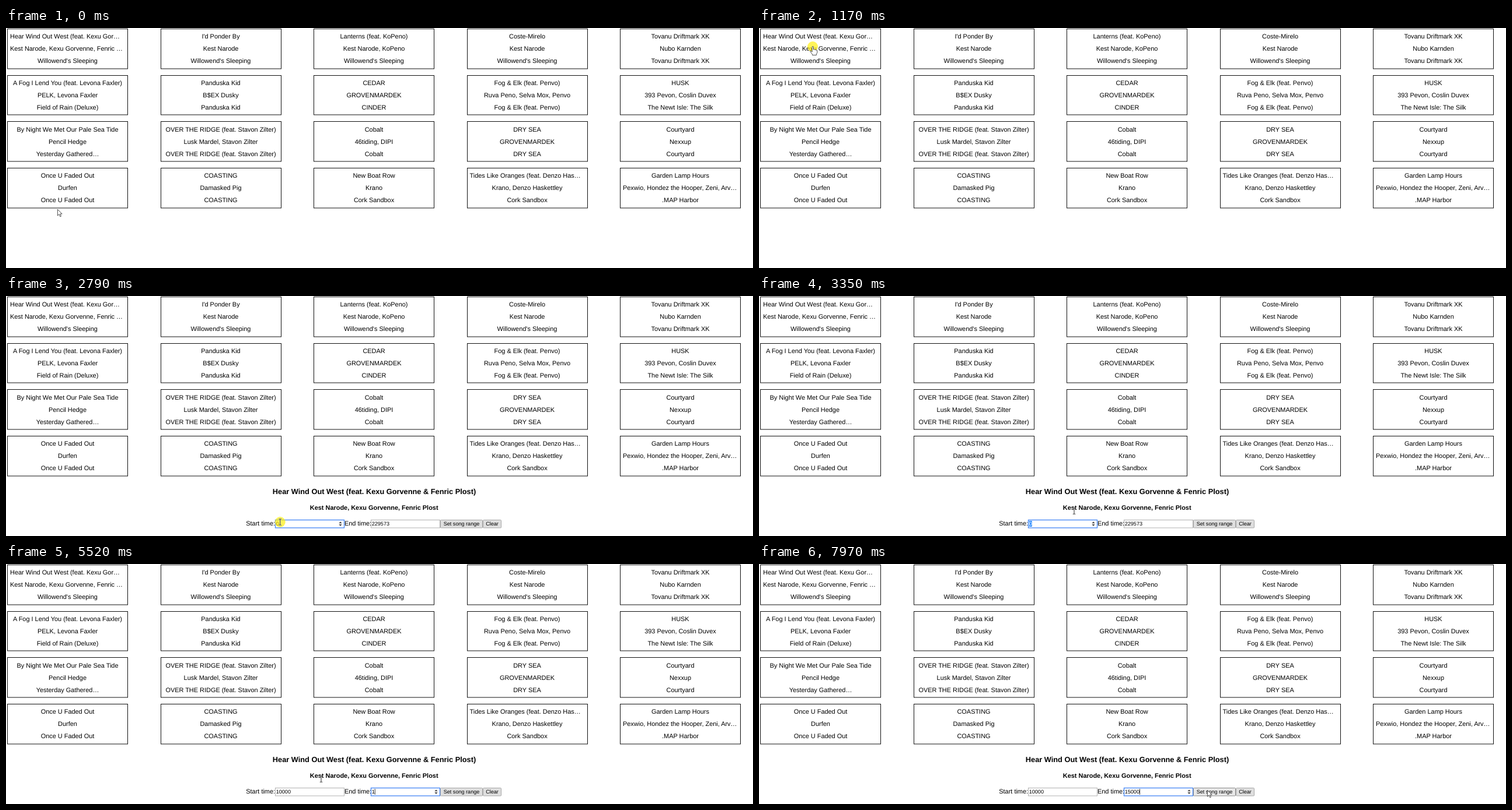
An HTML page that plays this animation: 1280 by 412 pixels, repeating every 8000 ms.

```html
<!DOCTYPE html>
<html lang="en">
<head>
<meta charset="utf-8">
<title>Song range picker</title>
<style>
  html, body { margin: 0; width: 100%; height: 100%; overflow: hidden; background: #fff; }
  svg { display: block; }
  text {
    font: 10.93px "Liberation Sans", Arial, sans-serif;
    text-rendering: geometricPrecision;
    white-space: pre;
  }
  .middle { text-anchor: middle; }
  .title { font-size: 12.79px; font-weight: bold; }
  .artists { font-weight: bold; }
  .control { font-size: 9.1px; }
  .card { fill: none; stroke: #111; }
</style>
</head>
<body>
<svg id="stage" width="1280" height="412" viewBox="0 0 1280 412"></svg>
<script>
const LOOP = 8000;
const stage = document.getElementById('stage');

// Each row holds five cards: title | artists | album. A trailing "~" marks a clipped line.
const rows = [
  ["Hear Wind Out West (feat. Kexu Gor~|Kest Narode, Kexu Gorvenne, Fenric ~|Willowend's Sleeping",
   "I'd Ponder By|Kest Narode|Willowend's Sleeping",
   "Lanterns (feat. KoPeno)|Kest Narode, KoPeno|Willowend's Sleeping",
   "Coste-Mirelo|Kest Narode|Willowend's Sleeping",
   "Tovanu Driftmark XK|Nubo Karnden|Tovanu Driftmark XK"],
  ["A Fog I Lend You (feat. Levona Faxler)|PELK, Levona Faxler|Field of Rain (Deluxe)",
   "Panduska Kid|B$EX Dusky|Panduska Kid",
   "CEDAR|GROVENMARDEK|CINDER",
   "Fog & Elk (feat. Penvo)|Ruva Peno, Selva Mox, Penvo|Fog & Elk (feat. Penvo)",
   "HUSK|393 Pevon, Coslin Duvex|The Newt Isle: The Silk"],
  ["By Night We Met Our Pale Sea Tide|Pencil Hedge|Yesterday Gathered…",
   "OVER THE RIDGE (feat. Stavon Zilter)|Lusk Mardel, Stavon Zilter|OVER THE RIDGE (feat. Stavon Zilter)",
   "Cobalt|46tiding, DIPI|Cobalt",
   "DRY SEA|GROVENMARDEK|DRY SEA",
   "Courtyard|Nexxup|Courtyard"],
  ["Once U Faded Out|Durfen|Once U Faded Out",
   "COASTING|Damasked Pig|COASTING",
   "New Boat Row|Krano|Cork Sandbox",
   "Tides Like Oranges (feat. Denzo Has~|Krano, Denzo Haskettley|Cork Sandbox",
   "Garden Lamp Hours|Pexwio, Hondez the Hooper, Zeni, Arv~|.MAP Harbor"]
];
const COL = 262.5, ROW = 79.67;

function add(parent, tag, attrs = {}, text) {
  const node = document.createElementNS('http://www.w3.org/2000/svg', tag);
  for (const name in attrs) node.setAttribute(name, attrs[name]);
  if (text !== undefined) node.textContent = text;
  parent.append(node);
  return node;
}
const show = (node, on) => node.setAttribute('visibility', on ? 'visible' : 'hidden');

rows.forEach((cards, r) => cards.forEach((card, c) => {
  const left = Math.round(2 + COL * c), top = Math.round(1 + ROW * r);
  const bottom = Math.round(69.6 + ROW * r);
  add(stage, 'rect', { class: 'card', x: left + .5, y: top + .5, width: 206, height: bottom - top - .5 });
  card.split('|').forEach((line, i) => {
    const y = 18.4 + ROW * r + 20.9 * i;
    if (line.endsWith('~')) add(stage, 'text', { x: 7 + COL * c, y }, line.slice(0, -1) + '…');
    else add(stage, 'text', { class: 'middle', x: 105.5 + COL * c, y }, line);
  });
}));

const panel = add(stage, 'g');
add(panel, 'text', { class: 'middle title', x: 631, y: 339.5 },
  'Hear Wind Out West (feat. Kexu Gorvenne & Fenric Plost)');
add(panel, 'text', { class: 'middle artists', x: 630.7, y: 367 },
  'Kest Narode, Kexu Gorvenne, Fenric Plost');
add(panel, 'text', { x: 411.3, y: 394.4 }, 'Start time:');
add(panel, 'text', { x: 580, y: 394.4 }, 'End time:');

function makeField(x) {
  const box = add(panel, 'rect', { x: x + .5, y: 384.5, width: 118, height: 13.5, fill: '#fff' });
  const mark = add(panel, 'rect', { x: x + 1.8, y: 386, height: 10, fill: '#3390ff' });
  const text = add(panel, 'text', { class: 'control', x: x + 1.7, y: 394.4 });
  const caret = add(panel, 'rect', { y: 386, width: .8, height: 10 });
  const spinner = add(panel, 'path', {
    d: `M${x + 109.4} 390.2l2.6-3 2.6 3zm0 1.8l2.6 3 2.6-3z`, fill: '#444'
  });
  return ({ value, focused, selected, caretOn, spin }) => {
    const width = value.length * 5.06;
    box.setAttribute('stroke', focused ? '#4285f4' : '#a9a9a9');
    box.setAttribute('stroke-width', focused ? 1.3 : .9);
    text.textContent = value;
    text.setAttribute('fill', selected ? '#fff' : '#000');
    mark.setAttribute('width', width);
    caret.setAttribute('x', x + 1.7 + width);
    show(mark, selected);
    show(caret, caretOn);
    show(spinner, spin);
  };
}

function makeButton(x, width, label) {
  const box = add(panel, 'rect', { x: x + .5, y: 384.5, width: width - 1, height: 13.5, rx: 1 });
  add(panel, 'text', { class: 'middle control', x: x + width / 2, y: 394.4 }, label);
  return hover => {
    box.setAttribute('fill', hover ? '#e8e8e8' : '#dfdfdf');
    box.setAttribute('stroke', hover ? '#8c8c8c' : '#a8a8a8');
  };
}

const drawStart = makeField(461), drawEnd = makeField(625);
const drawSetButton = makeButton(744, 73, 'Set song range');
makeButton(817, 32, 'Clear')(false);

const pointer = add(stage, 'g');
const press = add(pointer, 'circle', { r: 9, fill: '#ffee00', opacity: .65 });
const ink = { fill: '#fff', stroke: '#222', 'stroke-width': .8, 'stroke-linejoin': 'round' };
const arrow = add(pointer, 'path', { ...ink, d: 'M.4.4V11.2L2.9 8.8 4.8 12.9 6.5 12.1 4.7 8.2H8.1Z' });
const hand = add(pointer, 'path', { ...ink,
  d: 'M-1 9V1Q-1-.4.2-.4T1.4 1V5Q2.6 4 3.7 5.3 5 4.5 5.9 5.9 7.6 5.5 7.7 7.2V10.5L6.3 13V14.6H-.6V13.2L-4.2 8.4Q-4.4 6.8-3 7.1Z' });
const beam = add(pointer, 'g');
const beamPath = 'M-2.2-5.3H-.6L0-4.8.6-5.3H2.2M0-4.8V4.8M-2.2 5.3H-.6L0 4.8.6 5.3H2.2';
add(beam, 'path', { d: beamPath, fill: 'none', stroke: '#fff', 'stroke-width': 2.2, opacity: .6 });
add(beam, 'path', { d: beamPath, fill: 'none', stroke: '#111', 'stroke-width': .9 });

// time, x, y
const path = [
  [0, 88, 311], [50, 88, 308], [250, 100, 250], [450, 107, 150], [650, 99, 60],
  [790, 92, 33], [920, 92, 32], [1630, 92, 32], [1850, 150, 125], [2090, 230, 281.5],
  [2250, 350, 345], [2410, 458, 376], [2460, 464, 385], [2560, 470, 388], [2790, 470, 388],
  [2950, 428, 388], [3020, 428, 388], [3350, 540, 369], [7310, 540, 369],
  [7360, 553, 363], [7460, 600, 358], [7700, 715, 372], [7970, 768, 388], [8000, 768, 388]
];

function pointerAt(t) {
  const i = path.findIndex(point => point[0] > t);
  const [t0, x0, y0] = path[i - 1], [t1, x1, y1] = path[i];
  const k = (t - t0) / (t1 - t0);
  return [x0 + (x1 - x0) * k, y0 + (y1 - y0) * k];
}

function cursorOver(x, y) {
  if (y < 310) return (x - 2) % COL < 207 && (y - 1) % ROW < 69 ? 'hand' : 'arrow';
  const overArtists = y > 352 && y < 372 && x > 521 && x < 740;
  const overFields = y > 383 && y < 399 && x > 411 && x < 744;
  return overArtists || overFields ? 'beam' : 'arrow';
}

function typed(t, initial, digits, times) {
  const count = times.filter(time => t >= time).length;
  return count ? digits.slice(0, count) : initial;
}

function draw(t) {
  const within = (from, to) => t >= from && t < to;
  const [x, y] = pointerAt(t), cursor = cursorOver(x, y);

  show(panel, true);
  panel.style.display = t >= 1250 ? '' : 'none';
  drawStart({
    value: typed(t, '0', '10000', [3990, 4140, 4500, 4630, 4830]),
    focused: within(2790, 5010),
    selected: within(2850, 3990),
    caretOn: within(3990, 5010),
    spin: within(2460, 5010)
  });
  drawEnd({
    value: typed(t, '229573', '15000', [5520, 5620, 6030, 6210, 6440]),
    focused: t >= 5010,
    selected: within(5010, 5520),
    caretOn: within(5520, 6950) || t >= 7470,
    spin: t >= 5010
  });
  drawSetButton(y > 384 && x > 744 && x < 817);

  pointer.setAttribute('transform', `translate(${x} ${y})`);
  show(press, within(1170, 1250) || within(2790, 3000));
  show(arrow, cursor === 'arrow');
  show(hand, cursor === 'hand');
  beam.style.display = cursor === 'beam' ? '' : 'none';
}

const begin = performance.now();
function tick() {
  draw((performance.now() - begin) % LOOP);
  requestAnimationFrame(tick);
}
tick();
</script>
</body>
</html>
```
